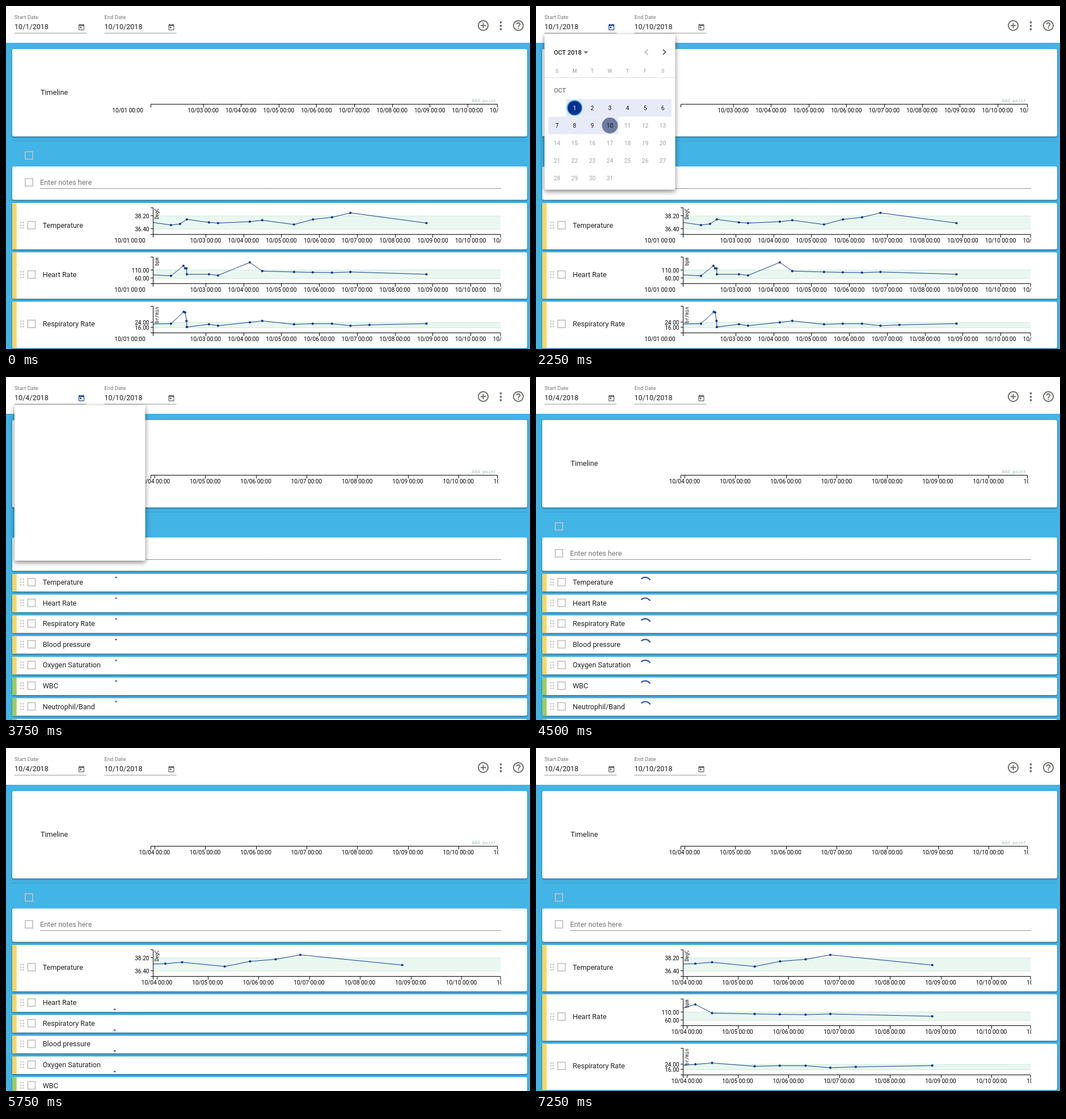
Write an HTML page with a canvas that moves like this. It is 924 px wide and 606 px high and loops after 8 s.

```html
<!DOCTYPE html>
<html lang="en">
<head>
<meta charset="utf-8">
<title>Vital signs dashboard</title>
<style>
html, body { margin: 0; width: 924px; height: 606px; overflow: hidden; background: #42b4e6; }
canvas { display: block; }
</style>
</head>
<body>
<canvas id="stage" width="924" height="606"></canvas>
<script>
const g = document.getElementById('stage').getContext('2d');
const LOOP = 8000, STEP = 250;
const SANS = 'Roboto, sans-serif', MONO = '"DejaVu Sans Mono", monospace';
const INK = '#212121', GREY = '#757575', NAVY = '#0b3a8f';
const YELLOW = '#fdd561', GREEN = '#9ccc5f';

const ICONS = {
  today: 'M19 3h-1V1h-2v2H8V1H6v2H5c-1.1 0-2 .9-2 2v14c0 1.1.9 2 2 2h14c1.1 0 2-.9 2-2V5c0-1.1-.9-2-2-2zm0 16H5V8h14v11zM7 10h5v5H7z',
  add: 'M13 7h-2v4H7v2h4v4h2v-4h4v-2h-4V7zm-1-5C6.48 2 2 6.48 2 12s4.48 10 10 10 10-4.48 10-10S17.52 2 12 2zm0 18c-4.41 0-8-3.59-8-8s3.59-8 8-8 8 3.59 8 8-3.59 8-8 8z',
  help: 'M11 18h2v-2h-2v2zm1-16C6.48 2 2 6.48 2 12s4.48 10 10 10 10-4.48 10-10S17.52 2 12 2zm0 18c-4.41 0-8-3.59-8-8s3.59-8 8-8 8 3.59 8 8-3.59 8-8 8zm0-14c-2.21 0-4 1.79-4 4h2c0-1.1.9-2 2-2s2 .9 2 2c0 2-3 1.75-3 5h2c0-2.25 3-2.5 3-5 0-2.21-1.79-4-4-4z'
};

// Chart points are relative to the card top, on the 10/1 time scale.
const rows = [
  { name: 'Temperature', color: YELLOW, loaded: 5000, unit: 'DegC', ticks: [['38.20', 23], ['36.40', 46]],
    points: [[260, 34.5], [291, 39], [307, 37], [319, 29], [358, 34.3], [374, 35.5], [430, 33], [452, 30.5],
      [508, 38], [541.5, 29], [575, 25.3], [607.5, 17.5], [741.5, 35.5]] },
  { name: 'Heart Rate', color: YELLOW, loaded: 6250, unit: 'bpm', ticks: [['110.00', 31.3], ['60.00', 46]],
    points: [[260, 39.8], [291, 41.6], [313, 23.8], [316, 28.3], [318.5, 28.3], [319, 38.8], [358, 38.8], [374, 40.8],
      [430, 17.8], [452, 33.2], [508, 34.7], [541, 35.4], [575, 35.9], [607.5, 34.7], [741.5, 38.8]] },
  { name: 'Respiratory Rate', color: YELLOW, loaded: 6250, unit: 'br/min', ticks: [['24.00', 36.6], ['16.00', 46]],
    points: [[260, 39.4], [291, 38.9], [313.5, 18], [316, 19], [318.5, 34], [319, 44.8], [358, 39.9], [374, 42.4],
      [430, 36.5], [452, 34], [508, 40], [541, 38.9], [575, 38.9], [607.5, 42.5], [641, 41], [741.5, 38.8]] },
  { name: 'Blood pressure', color: YELLOW },
  { name: 'Oxygen Saturation', color: YELLOW },
  { name: 'WBC', color: GREEN },
  { name: 'Neutrophil/Band', color: GREEN },
  { name: '', color: GREEN }
];

function text(s, x, y, size, color = INK, align = 'left', family = SANS, weight = 400) {
  g.font = `${weight} ${size}px ${family}`;
  g.fillStyle = color;
  g.textAlign = align;
  g.fillText(s, x, y);
}
function rect(x, y, w, h, color) {
  g.fillStyle = color;
  g.fillRect(x, y, w, h);
}
function circle(x, y, r, color) {
  g.fillStyle = color;
  g.beginPath();
  g.arc(x, y, r, 0, 7);
  g.fill();
}
function line(points, color, width = 1) {
  g.strokeStyle = color;
  g.lineWidth = width;
  g.beginPath();
  points.forEach(p => g.lineTo(...p));
  g.stroke();
}
function icon(name, x, y, scale, color) {
  g.save();
  g.translate(x, y);
  g.scale(scale, scale);
  g.translate(-12, -12);
  g.fillStyle = color;
  g.fill(new Path2D(ICONS[name]));
  g.restore();
}
function card(x, y, w, h, blur = 3, drop = 1.5, shade = .42, radius = 3) {
  g.save();
  g.shadowColor = `rgba(0,0,0,${shade})`;
  g.shadowBlur = blur;
  g.shadowOffsetY = drop;
  g.fillStyle = '#fff';
  g.beginPath();
  g.roundRect(x, y, w, h, radius);
  g.fill();
  g.restore();
}
function checkbox(x, y) {
  g.strokeStyle = '#c2c2c2';
  g.lineWidth = 1.7;
  g.strokeRect(x - 6.6, y - 6.6, 13.2, 13.2);
}

function dateAxis(left, right, y, fourth, pitch, first) {
  line([[left, y + 5.5], [left, y], [right, y], [right, y + 5.5]], '#000');
  g.save();
  g.beginPath();
  g.rect(0, y - 5, right + 1.5, 30);
  g.clip();
  for (let day = first; day <= 11; day++) {
    if (day === 2) continue;
    const x = fourth + (day - 4) * pitch;
    if (x > left && x < right) line([[Math.round(x) + .5, y], [Math.round(x) + .5, y + 5.5]], '#000');
    text(`10/${String(day).padStart(2, '0')} 00:00`, x, y + 14.7, 10.1, '#000', 'center');
  }
  g.restore();
}

function chart(row, top, first, fading) {
  const base = Math.round(top) + 55.5;
  const [[, high], [, low]] = row.ticks;
  rect(260, top + high, 612, low - high, '#eaf7f1');
  for (const y of [high, low]) line([[260, top + y], [872, top + y]], '#c9eadb');

  const pitch = first === 1 ? 66.75 : 89.5, fourth = first === 1 ? 418.7 : 266;
  const points = row.points.map(([x, y]) => [fourth + (x - 418.8) * pitch / 66.75, top + y]);
  g.save();
  g.beginPath();
  g.rect(260, top, 612, 60);
  g.clip();
  if (fading) g.globalAlpha = .2;
  line(points, NAVY);
  points.slice(1).forEach(([x, y]) => circle(x, y, 2.1, NAVY));
  g.restore();
  if (fading) text('No Data Available', 566, top + 36.2, 15.6, '#a9bab2', 'center', MONO);

  dateAxis(259.5, 872, base, fourth, pitch, first);
  line([[255, base - 47], [259.5, base - 47], [259.5, base], [255, base]], '#000');
  for (const [label, y] of row.ticks) {
    const tickY = Math.round(top + y) - .5;
    line([[255, tickY], [259.5, tickY]], '#000');
    text(label, 252.5, tickY + 4.2, 10.1, '#000', 'right');
  }
  g.save();
  g.translate(269, base - 46);
  g.rotate(-Math.PI / 2);
  text(row.unit, 0, 0, 8, '#000', 'right', MONO);
  g.restore();
}

// cubic-bezier(.35, 0, .25, 1)
function ease(x) {
  let lo = 0, hi = 1;
  for (let i = 0; i < 20; i++) {
    const u = (lo + hi) / 2, v = 1 - u;
    if (1.05 * u * v * v + .75 * u * u * v + u ** 3 < x) lo = u; else hi = u;
  }
  return lo * lo * (3 - 2 * lo);
}
// The arc grows from its tail for half a second, then shrinks towards its head.
function spinner(x, y, t) {
  const cycle = Math.floor(t / 1000), phase = t % 1000 / 500;
  const growing = phase < 1;
  const span = growing ? 18 + 270 * ease(phase) : 288 - 270 * ease(phase - 1);
  const start = -90 - 90 * cycle + t * .18 + (growing ? 0 : 288 - span);
  g.strokeStyle = '#2f56b0';
  g.lineWidth = 2.2;
  g.beginPath();
  g.arc(x, y, 10.4, start * Math.PI / 180, (start + span) * Math.PI / 180);
  g.stroke();
}

function dateField(x, label, value, active) {
  text(label, x, 22.5, 9.45, GREY);
  text(value, x, 41.3, 12.6);
  line([[x, 48], [x + 127, 48]], '#949494');
  icon('today', x + 118, 37.6, .5625, active ? '#12409c' : '#5f5f5f');
}

function header(first, active) {
  rect(0, 0, 924, 65, '#fff');
  dateField(15, 'Start Date', `10/${first}/2018`, active);
  dateField(173.5, 'End Date', '10/10/2018', false);
  icon('add', 841.5, 34.5, .95, '#6e6e6a');
  for (const y of [29, 35, 41]) circle(872.5, y, 1.9, '#6e6e6a');
  icon('help', 903.5, 34.5, .95, '#6e6e6a');
}

function panels(first) {
  card(11, 76, 908, 154.5);
  text('Timeline', 61, 156.7, 12.6);
  text('Add point', 864, 170, 7.9, '#a3bcb0', 'right', MONO);
  if (first === 1) dateAxis(255.5, 866.5, 173.5, 414.3, 66.57, 1);
  else dateAxis(255.5, 866.5, 173.5, 262, 89.3, 4);

  line([[11, 238.5], [919, 238.5]], 'rgba(0,0,0,.13)');
  checkbox(40.5, 264);
  card(11, 283.5, 908, 59);
  checkbox(40.5, 311.5);
  text('Enter notes here', 60, 315.5, 12.6, GREY);
  line([[60, 322.5], [873, 322.5]], '#949494');
}

function rowList(t, first) {
  let top = 348;
  for (const row of rows) {
    const open = first === 1 ? row.points : t >= row.loaded;
    const mid = top + (open ? 39.2 : 14.4);
    card(11, top, 908, open ? 82 : 31);
    rect(11, top, 7.7, open ? 82 : 31, row.color);
    for (const dx of [26, 30.5])
      for (const dy of [-4.8, 0, 4.8]) circle(dx, mid + dy, 1.5, '#cacaca');
    checkbox(45, mid);
    text(row.name, 64.7, mid + 4.6, 12.6);
    if (open) chart(row, top, first, t === 5000 && first === 4);
    else spinner(192.5, top + 16.3, Math.max(0, t - 3775));
    top += open ? 87.2 : 36.6;
  }
}

function calendar(hover) {
  const pitch = 31.1, colX = c => 37 + c * pitch, rowY = r => 180 + r * pitch;
  text('OCT 2018', 31.5, 85.5, 11, INK, 'left', SANS, 500);
  g.fillStyle = GREY;
  g.fill(new Path2D('M84 80h8l-4 4.3z'));
  line([[197.3, 77], [192.3, 81.5], [197.3, 86]], '#bdbdbd', 1.7);
  line([[223.7, 77], [228.7, 81.5], [223.7, 86]], '#5f5f5f', 1.7);
  [...'SMTWTFS'].forEach((d, c) => text(d, colX(c), 117.6, 9, '#9c9c9c', 'center'));
  line([[15, 126.5], [245, 126.5]], '#e0e0e0');
  text('OCT', 31.5, 152.5, 11, GREY, 'left', SANS, 500);

  rect(52.5, 164.5, 186.5, 31, '#e7ebf8');
  rect(21.5, 195.5, 124, 31, '#e7ebf8');
  circle(colX(1), rowY(0), 14, '#56b9f0');
  circle(colX(1), rowY(0), 12.3, '#04318c');
  if (hover) circle(colX(4), rowY(0), 14, '#e0e3e8');
  circle(colX(3), rowY(1), 14, '#6d7ba3');
  for (let day = 1; day <= 31; day++) {
    const color = day === 1 ? '#fff' : day <= 10 ? '#141414' : '#a2a2a2';
    text(day, colX(day % 7), rowY(Math.floor(day / 7)) + 3.7, 10.2, color, 'center');
  }
}

function popup(t) {
  if (t < 1750 || t >= 4000) return;
  const opening = t < 2000;
  g.save();
  if (opening) g.globalAlpha = .32;
  card(15, 50, 230.5, opening ? 74 : 274.5, 8, 3, .5, 2);
  if (!opening && t < 3750) calendar(t >= 2750);
  g.restore();
  if (opening) {
    circle(130.5, 37, 15.7, '#9b3ba5');
    circle(132.5, 37.5, 9.5, '#8d2c93');
  }
}

function draw(t) {
  const first = t < 3750 ? 1 : 4;
  rect(0, 0, 924, 606, '#42b4e6');
  header(first, t >= 1750 && t < 4000);
  panels(first);
  rowList(t, first);
  popup(t);
}

function tick(now) {
  draw(Math.floor(now % LOOP / STEP) * STEP);
  requestAnimationFrame(tick);
}
requestAnimationFrame(tick);
</script>
</body>
</html>
```
